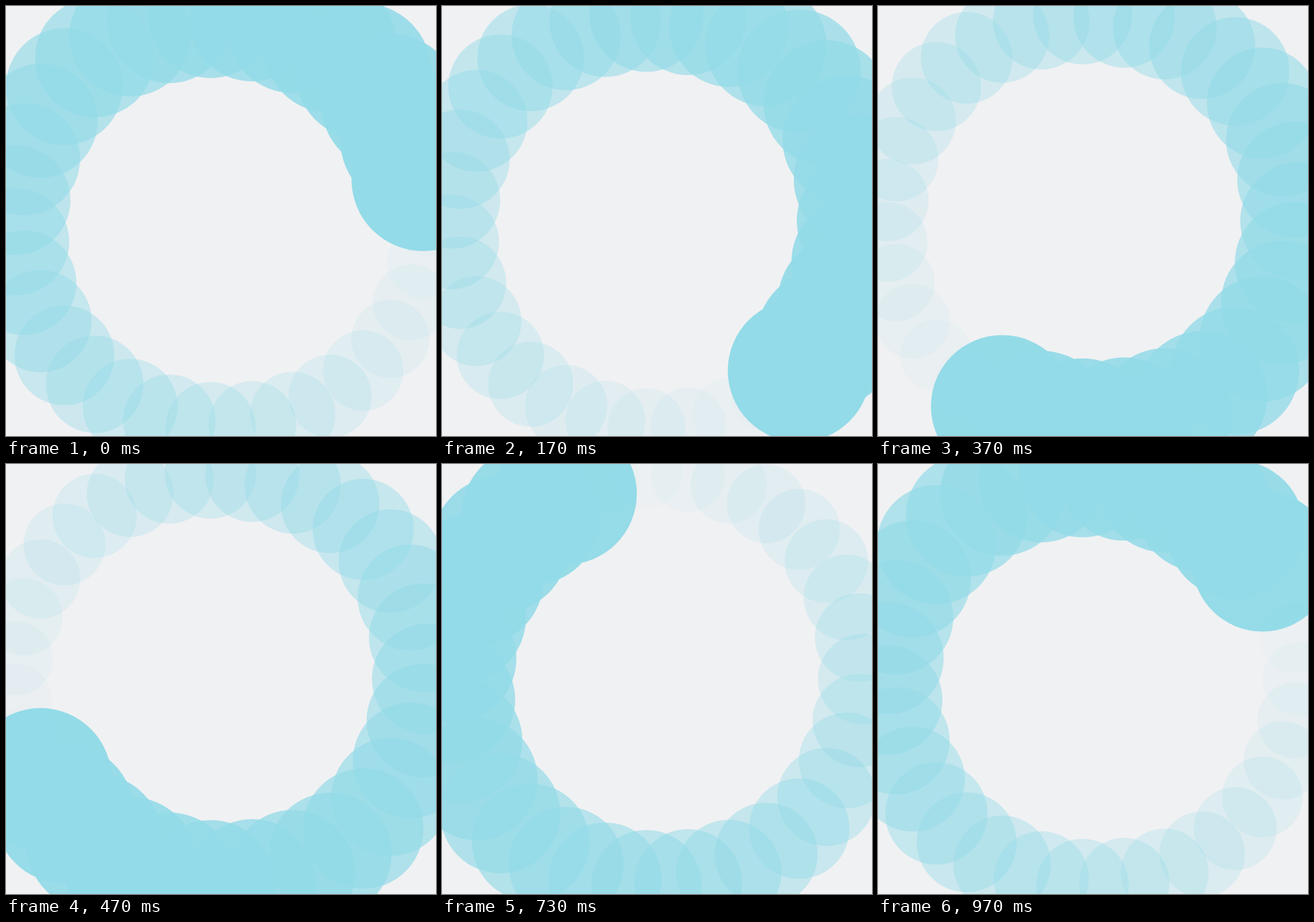
Recreate the animation shown at these times as an HTML page. Size 748 by 748 pixels, loop 1 s.

```html
<!DOCTYPE html>
<html lang="en">
<head>
<meta charset="utf-8">
<title>Ring loader</title>
<style>
  html, body { margin: 0; width: 100%; height: 100%; overflow: hidden; background: #f0f1f3; }
  svg { display: block; width: 100%; height: 100%; }
  circle { fill: #93dbe8; }
</style>
</head>
<body>
<svg id="ring" viewBox="0 0 748 748"></svg>
<script>
  const DOTS = 31, STEPS = 30, LOOP = 1000;
  const CENTER = 374, RING = 359;
  const R_START = 124.6, R_END = 59.6;
  const ring = document.getElementById('ring');

  // Share of its life a dot has spent at a step; whole numbers keep the wrap exact.
  function ageAt(dot, step) {
    const span = DOTS * STEPS;
    const ticks = DOTS * step - STEPS * (dot + 1);
    return ((ticks % span + span) % span) / span;
  }

  function pose(dot, step) {
    const age = ageAt(dot, step);
    return { r: `${R_START + (R_END - R_START) * age}px`, opacity: 1 - age };
  }

  // Steps are held, and begin on multiples of 10 ms.
  function keyframes(dot) {
    const frames = [];
    for (let step = 0; step < STEPS; step++) {
      const start = Math.round(step * LOOP / STEPS / 10) * 10;
      frames.push({ offset: start / LOOP, easing: 'steps(1, end)', ...pose(dot, step) });
    }
    frames.push({ offset: 1, ...pose(dot, STEPS - 1) });
    return frames;
  }

  for (let dot = 0; dot < DOTS; dot++) {
    const angle = dot / DOTS * 2 * Math.PI;
    const circle = document.createElementNS('http://www.w3.org/2000/svg', 'circle');
    circle.setAttribute('cx', CENTER + RING * Math.cos(angle));
    circle.setAttribute('cy', CENTER + RING * Math.sin(angle));
    ring.append(circle);
    circle.animate(keyframes(dot), { duration: LOOP, iterations: Infinity });
  }
</script>
</body>
</html>
```
